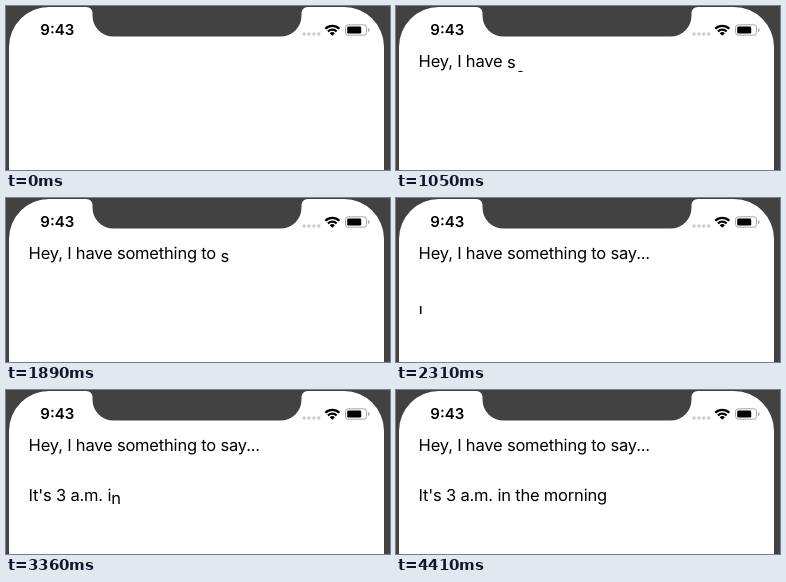
An HTML page with a canvas for the animation above (4.62 s loop, 384 by 164 pixels).

```html
<!DOCTYPE html>
<html lang="en">
<head>
<meta charset="utf-8">
<title>Rising letters</title>
<style>
  html, body { margin: 0; width: 100%; height: 100%; overflow: hidden; background: #424242; }
  canvas { display: block; width: 384px; height: 164px; }
</style>
</head>
<body>
<canvas id="stage" width="384" height="164"></canvas>
<script>
const ctx = document.getElementById('stage').getContext('2d');
const LOOP = 4620, STEP = 70, LAST = 4410;
const BEZEL = '#424242', INK = '#000';
const FAMILY = 'Inter, Roboto, sans-serif';
const BODY_FONT = '400 16.5px ' + FAMILY;

// Each letter rises by RISE px over DURATION ms, decelerating.
const RISE = 18, DURATION = 105, LEAD = 62;

const LINES = [
  { text: 'Hey, I have something to say...', first: 0, y: 61 },
  { text: "It's 3 a.m. in the morning", first: 32, y: 111 }
];
const LEFT = 22.6, TRACKING = -0.19;

// Typing rhythm: [letter index, ms], linear in between.
const RHYTHM = [
  [0, 290], [8, 715], [9, 825], [13, 1097], [25, 1893],
  [32, 2340], [35, 2545], [37, 2737], [45, 3360], [57, 4310]
];

ctx.textRendering = 'geometricPrecision';
ctx.fontKerning = 'normal';

function startOf(index) {
  let k = 1;
  while (RHYTHM[k][0] < index) k++;
  const [i0, t0] = RHYTHM[k - 1], [i1, t1] = RHYTHM[k];
  return t0 + (t1 - t0) * (index - i0) / (i1 - i0) - LEAD;
}

function layOut() {
  ctx.font = BODY_FONT;
  return LINES.map(({ text, first, y }) => ({
    y,
    letters: [...text].map((char, i) => ({
      char,
      x: LEFT + ctx.measureText(text.slice(0, i + 1)).width
        - ctx.measureText(char).width + i * TRACKING,
      start: startOf(first + i)
    }))
  }));
}
const lines = layOut();

function fillRound(x, y, w, h, r, color) {
  ctx.fillStyle = color;
  ctx.beginPath();
  ctx.roundRect(x, y, w, h, r);
  ctx.fill();
}

function drawPhone() {
  ctx.fillStyle = BEZEL;
  ctx.fillRect(0, 0, 384, 164);
  fillRound(3, 1, 375, 300, 40, '#fff');

  // notch with flared top corners
  ctx.fillStyle = BEZEL;
  ctx.beginPath();
  ctx.moveTo(80, 0);
  ctx.lineTo(80, 1);
  ctx.arcTo(86.5, 1, 86.5, 8, 6);
  ctx.arcTo(86.5, 30.6, 110, 30.6, 21);
  ctx.arcTo(295.5, 30.6, 295.5, 8, 21);
  ctx.arcTo(295.5, 1, 302, 1, 6);
  ctx.lineTo(302, 0);
  ctx.fill();
}

function drawWifi(x, y) {
  const from = -Math.PI * 0.75, to = -Math.PI * 0.25;
  ctx.fillStyle = ctx.strokeStyle = INK;
  ctx.lineWidth = 2.3;
  for (const r of [6.1, 9.9]) {
    ctx.beginPath();
    ctx.arc(x, y, r, from, to);
    ctx.stroke();
  }
  ctx.beginPath();
  ctx.moveTo(x, y);
  ctx.arc(x, y, 3.7, from, to);
  ctx.fill();
}

function drawBattery() {
  ctx.strokeStyle = '#a6a6a6';
  ctx.lineWidth = 1;
  ctx.beginPath();
  ctx.roundRect(339.5, 18.8, 21, 10.4, 2.7);
  ctx.stroke();
  fillRound(341.2, 20.5, 14, 7, 1.3, INK);
  fillRound(362, 22.2, 1.4, 3.6, [0, 1.4, 1.4, 0], '#a6a6a6');
}

function drawStatus() {
  ctx.fillStyle = INK;
  ctx.font = '600 15px ' + FAMILY;
  ctx.fillText('9:43', 34.3, 29.4);
  for (let i = 0; i < 4; i++) {
    fillRound(296.3 + i * 4.9, 26.2, 3.5, 3.5, 1.75, '#cbcbcb');
  }
  drawWifi(326.3, 29.8);
  drawBattery();
}

function drawLine({ y, letters }, time) {
  ctx.save();
  ctx.beginPath();
  ctx.rect(0, y - 14, 384, 19);
  ctx.clip();
  ctx.fillStyle = INK;
  ctx.font = BODY_FONT;
  for (const { char, x, start } of letters) {
    const p = Math.min((time - start) / DURATION, 1);
    if (p > 0) ctx.fillText(char, x, y + RISE * (1 - p) ** 2);
  }
  ctx.restore();
}

function draw(now) {
  const elapsed = (now + 1) % LOOP;
  const time = Math.min(Math.floor(elapsed / STEP) * STEP, LAST);
  drawPhone();
  drawStatus();
  lines.forEach(line => drawLine(line, time));
}

function tick() {
  draw(performance.now());
  requestAnimationFrame(tick);
}
tick();
</script>
</body>
</html>
```
